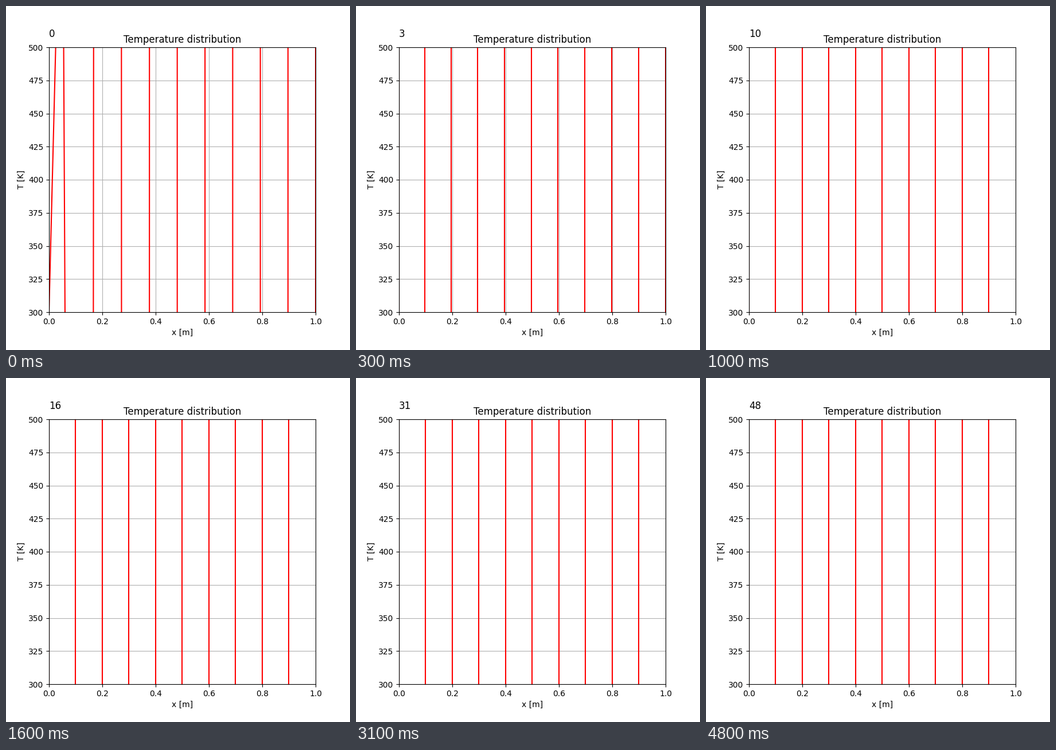
A matplotlib script for the animation above (4.9 s loop, 600 by 600 pixels).

```python
import numpy as np
import matplotlib.pyplot as plt
from matplotlib.animation import FuncAnimation

CELLS = 10
FRAMES = 49
STEPS_PER_FRAME = 10
T_LEFT, T_RIGHT = 300.0, 500.0
FOURIER = 1.0  # above the stability limit, so the solution blows up

dx = 1 / CELLS
x = np.concatenate(([0], (np.arange(CELLS) + 0.5) * dx, [1]))


def step(T):
    """One explicit finite-volume step with fixed wall temperatures."""
    flux = np.diff(T)
    flux[[0, -1]] *= 2  # half-cell distance to the walls
    new = T.copy()
    new[1:-1] += FOURIER * np.diff(flux)
    return new


def solve():
    T = np.full(CELLS + 2, T_LEFT)
    T[-1] = T_RIGHT
    history = []
    for _ in range(FRAMES):
        for _ in range(STEPS_PER_FRAME):
            T = step(T)
        history.append(T)
    return history


history = solve()

fig, ax = plt.subplots(figsize=(6, 6), dpi=100)
ax.set(xlim=(0, 1), ylim=(300, 500), xlabel="x [m]", ylabel="T [K]",
       title="Temperature distribution")
ax.grid()
line, = ax.plot([], [], "r")
counter = ax.text(0, 1.04, "", fontsize=12, transform=ax.transAxes)


def update(i):
    # Far-off values only set the slope, so a cap keeps the renderer exact.
    line.set_data(x, history[i] / max(1, np.abs(history[i]).max() / 1e12)
                  if i > 3 else history[i])
    counter.set_text(str(i))
    return line, counter


anim = FuncAnimation(fig, update, frames=FRAMES, interval=100,
                     repeat=True, repeat_delay=0)
plt.show()
```
